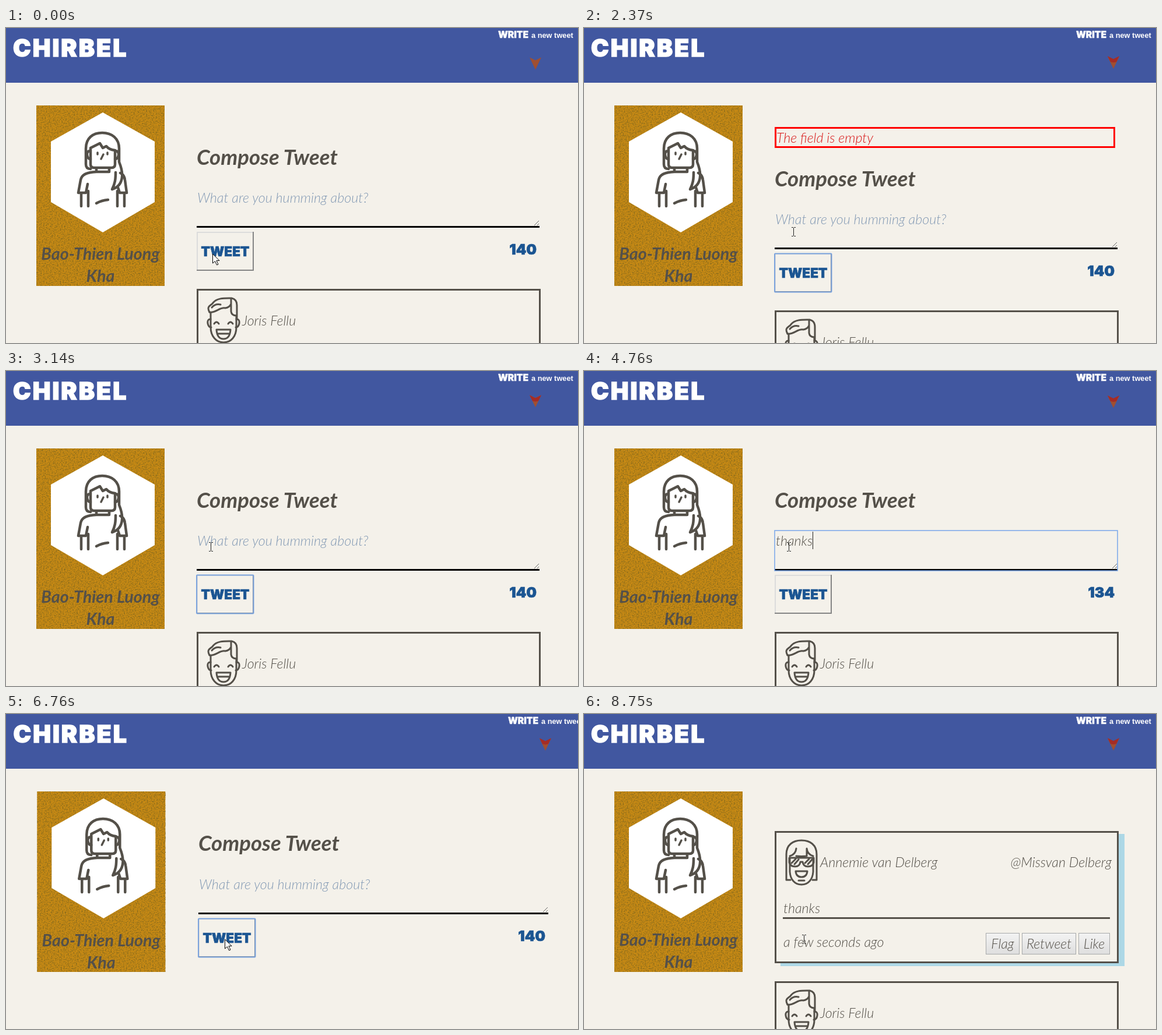
Animation of 981 by 541 pixels, one loop 8.83 s. Source, as an HTML page:

```html
<!DOCTYPE html>
<html lang="en">
<head>
<meta charset="utf-8">
<title>Compose a tweet</title>
<style>
html, body { margin: 0; width: 100%; height: 100%; overflow: hidden; background: #f4f1ea; }
svg { display: block; }
text { font: italic 300 23.3px Lato, "Open Sans", sans-serif; fill: #545049; white-space: pre; }
.block { font: 900 24px Inter, Roboto, sans-serif; fill: #1b5592; stroke: #1b5592; stroke-width: .7; }
.white { fill: #fff; stroke: #fff; }
.bold { font-weight: 700; }
.icon path { fill: none; stroke: #545049; stroke-linecap: round; stroke-linejoin: round; }
.box { fill: #f4f1ea; stroke: #545049; stroke-width: 3; }
.key { fill: url(#keyFill); stroke: #a7a9aa; }
.mid { text-anchor: middle; }
.end { text-anchor: end; }
</style>
</head>
<body>
<svg width="981" height="541" viewBox="0 0 981 541">
  <defs>
    <linearGradient id="keyFill" x2="0" y2="1">
      <stop stop-color="#f3f3f3"/><stop offset="1" stop-color="#dedede"/>
    </linearGradient>
    <filter id="grain" x="0" y="0" width="1" height="1" color-interpolation-filters="sRGB">
      <feTurbulence type="fractalNoise" baseFrequency=".42 .52" numOctaves="2" seed="4"/>
      <feColorMatrix values="0 0 0 0 .42  0 0 0 0 .36  0 0 0 0 .12  1.7 0 0 0 -.7"/>
    </filter>
    <clipPath id="errorClip"><rect id="errorWindow" x="328" y="173" width="582" height="30"/></clipPath>
    <clipPath id="composeClip"><rect id="composeWindow" x="320" y="180" width="661" height="361"/></clipPath>
  </defs>

  <rect width="981" height="541" fill="#f4f1ea"/>
  <rect width="981" height="94" fill="#4157a0"/>
  <text id="logo" class="block white" x="12" y="49" style="font-size:41px;letter-spacing:3px;stroke-width:1.5">CHIRBEL</text>
  <g id="nav">
    <text class="block white" x="844" y="17" style="font-size:15.6px;stroke-width:.4">WRITE</text>
    <text x="901" y="17" style="font:bold 12.8px 'Liberation Sans',Arial,sans-serif;fill:#fff">a new tweet</text>
    <path id="arrowBack" d="M-10 0L0 5L10 0L0 21Z" fill="#a04f32"/>
    <path id="arrowFront" d="M-10 0L0 5L10 0L5 10L0 11L-5 10Z" fill="#a52c26"/>
  </g>

  <g id="profile">
    <rect x="52" y="133" width="220" height="310" fill="#c88a14"/>
    <rect x="52" y="133" width="220" height="310" filter="url(#grain)"/>
    <path d="M166 145L255 195V299L166 351L77 299V195Z" fill="#fff"/>
    <g class="icon" stroke-width="4.5">
      <path d="M145 242Q137 242 137 234V207C137 189 149 180 165 180C182 180 194 190 194 207V230C198 240 200 247 199 256C198 267 191 274 182 277C187 267 188 260 188 248"/>
      <path d="M145 207V234Q145 240 151 240H181Q187 240 187 234V210M145 206L161 198L166 206L172 203Q177 209 187 210"/>
      <path d="M144 211Q138 212 139 218Q140 225 145 225M188 211Q194 212 193 218Q192 225 187 225"/>
      <path d="M155 242V247H177V242M155 247C139 248 130 251 128 261L124 283H137L140 268M196 249Q203 252 204 261L207 283H195L192 274"/>
      <path d="M129 285V306M141 280V306M191 280V306M203 285V306M155 301Q164 296 175 295" stroke-linecap="butt"/>
      <path d="M157 214V217M174 214V217M167 217L163 225" stroke-width="3.5"/>
    </g>
    <g id="owner">
      <text class="bold mid" x="162" y="398" style="font-size:28.7px">Bao-Thien Luong</text>
      <text class="bold mid" x="162" y="436" style="font-size:28.7px">Kha</text>
    </g>
  </g>

  <g id="error">
    <text x="330" y="197" clip-path="url(#errorClip)" style="fill:#d81818">The field is empty</text>
    <rect id="errorBox" x="328.5" y="171.5" width="581" fill="none" stroke="red" stroke-width="3"/>
  </g>

  <g clip-path="url(#composeClip)">
    <g id="compose">
      <text class="bold" x="327" y="235" style="font-size:36.6px">Compose Tweet</text>
      <g id="form">
        <text id="hint" x="328" y="300" style="fill:#8299b4">What are you humming about?</text>
        <text id="typed" x="329" y="300"></text>
        <rect id="caret" y="276" width="1" height="30" fill="#222"/>
        <path id="underline" stroke="#000" stroke-width="3"/>
        <rect id="fieldRing" x="327" y="274" width="588" height="69" fill="none" stroke="#78a6ea" stroke-width="1.5"/>
        <path d="M328 417V351H425" fill="none" stroke="#dcdcdc" stroke-width="2"/>
        <path d="M327 416H424V350" fill="none" stroke="#858585" stroke-width="2"/>
        <rect id="buttonRing" x="327" y="350.5" width="97.5" height="66" rx="1" fill="none" stroke="#7ba3dd" stroke-width="2"/>
        <text class="block mid" x="376" y="392" style="font-size:22.5px">TWEET</text>
        <g id="formRight">
          <path d="M906 339L914 331M911 339L914 336" stroke="#666"/>
          <text id="counter" class="block end" x="910" y="389" style="font-size:25px"></text>
        </g>
      </g>
    </g>
  </g>

  <g id="newTweet">
    <rect id="shadow" x="337" y="5" width="590" height="227" fill="#add8e6"/>
    <rect class="box" x="328.5" y="1.5" width="587" height="224"/>
    <g class="icon" stroke-width="3">
      <path d="M354 84H347V40C347 24 358 16 373 16C388 16 399 24 399 40V84H392"/>
      <path d="M353 46V70C354 84 362 92 373 92C384 92 392 84 393 70V46M353 43Q363 40 364 30M364 43Q373 44 382 43V30Q383 40 393 43"/>
      <path d="M352 46H394V54Q392 61 384 61Q376 61 375 53H371Q370 61 362 61Q354 61 352 54ZM356 55L363 48M361 57L368 49M379 55L386 48M384 57L391 49"/>
      <path d="M363 69H383Q382 79 373 79Q364 79 363 69ZM368 85H378"/>
    </g>
    <text x="405" y="62">Annemie van Delberg</text>
    <text class="end" x="905" y="62">@Missvan Delberg</text>
    <text x="342" y="141">thanks</text>
    <path d="M341 149.5H902" stroke="#545049" stroke-width="3"/>
    <text x="342" y="199">a few seconds ago</text>
    <rect class="key" x="689.5" y="175.5" width="57" height="36"/>
    <rect class="key" x="751.5" y="175.5" width="92" height="36"/>
    <rect class="key" x="848.5" y="175.5" width="53" height="36"/>
    <text class="mid" x="718" y="202">Flag</text>
    <text class="mid" x="797.5" y="202">Retweet</text>
    <text class="mid" x="875" y="202">Like</text>
  </g>

  <g id="oldTweet">
    <rect class="box" x="328.5" y="1.5" width="587" height="224"/>
    <g class="icon" stroke-width="3">
      <path d="M349 40C343 29 352 29 355 24C362 15 376 16 387 16Q396 18 396 28V52"/>
      <path d="M349 40C360 42 366 31 376 33Q383 32 386 26M353 32Q359 25 368 27M386 17V39Q387 46 395 46"/>
      <path d="M351 41V66C351 82 361 92 373 92C386 92 395 82 395 66V46"/>
      <path d="M351 52Q345 52 346 59Q347 66 352 66M395 52Q401 52 400 59Q399 66 394 66"/>
      <path d="M357 60Q361 54 365 60M381 60Q385 54 389 60M361 70H385Q384 86 373 86Q362 86 361 70ZM364 77H382"/>
    </g>
    <text x="405" y="63">Joris Fellu</text>
  </g>

  <path id="pointer" d="M0 0V16L4 12.5L7 19L9.5 18L6.5 11.5H11.5Z" fill="#fff" stroke="#000"/>
  <path id="beam" d="M-3.5 -7.5H-1L0 -6.5L1 -7.5H3.5M0 -6.5V6.5M-3.5 7.5H-1L0 6.5L1 7.5H3.5" fill="none" stroke="#222"/>
</svg>
<script>
const LOOP = 8830;
const SLIDE = 400;
const MESSAGE = 'thanks';
const TIMES = {
  firstClick: 800, errorIn: 885, errorOut: 2600, fieldFocus: 3450,
  typeStart: 3760, typeStep: 152, secondClick: 6380,
  listCleared: 6600, listLoaded: 6840, composeOut: 6880
};
// time, x, y
const CURSOR_PATH = [
  [0, 354.5, 388], [1850, 354.5, 388], [2350, 359.5, 350], [2450, 359.5, 350], [2950, 351.5, 302],
  [5150, 351.5, 302], [5520, 358, 346], [5950, 375.5, 387], [7000, 375.5, 387], [7250, 377.5, 387], [LOOP, 377.5, 387]
];

const ui = {};
document.querySelectorAll('[id]').forEach(el => ui[el.id] = el);

const clamp = v => Math.max(0, Math.min(1, v));
const swing = p => .5 - Math.cos(Math.PI * clamp(p)) / 2;
const slide = (t, start) => swing((t - start) / SLIDE);
const between = (t, a, b) => t >= a && t < b;
const show = (el, on) => el.setAttribute('display', on ? 'inline' : 'none');
const move = (el, x, y) => el.setAttribute('transform', `translate(${x} ${y})`);
const write = (el, s) => { if (el.textContent !== s) el.textContent = s; };

function cursorAt(t) {
  const i = CURSOR_PATH.findIndex(k => k[0] > t);
  const [t0, x0, y0] = CURSOR_PATH[i - 1], [t1, x1, y1] = CURSOR_PATH[i];
  const p = swing((t - t0) / (t1 - t0));
  return [x0 + (x1 - x0) * p, y0 + (y1 - y0) * p];
}

function drawArrow(t) {
  const bob = lag => 46 - 5 * Math.cos(2 * Math.PI * (t - 1050 - lag) / 1950);
  move(ui.arrowBack, 908, bob(60));
  move(ui.arrowFront, 908, bob(0));
  ui.arrowFront.setAttribute('opacity', clamp(t / 900));
}

// Draws the message box and returns how far it pushes the page down.
function drawError(t) {
  const visible = between(t, TIMES.errorIn, TIMES.errorOut + SLIDE);
  const inner = Math.round(30 * (slide(t, TIMES.errorIn) - slide(t, TIMES.errorOut)));
  show(ui.error, visible);
  ui.errorWindow.setAttribute('height', inner);
  ui.errorBox.setAttribute('height', inner + 3);
  return visible ? inner + 7 : 0;
}

function drawForm(t, wide) {
  const posted = t >= TIMES.listCleared;
  const count = Math.floor((t - TIMES.typeStart) / TIMES.typeStep) + 1;
  const typed = posted ? '' : MESSAGE.slice(0, Math.max(0, count));
  const focused = between(t, TIMES.fieldFocus, TIMES.secondClick);
  const lastKey = typed ? TIMES.typeStart + (typed.length - 1) * TIMES.typeStep : TIMES.fieldFocus;
  write(ui.typed, typed);
  write(ui.counter, String(140 - typed.length));
  show(ui.hint, !typed);
  show(ui.fieldRing, focused);
  show(ui.caret, focused && (t - lastKey) % 1000 < 500);
  ui.caret.setAttribute('x', Math.round(329 + ui.typed.getComputedTextLength()));
  show(ui.buttonRing, between(t, TIMES.firstClick, TIMES.fieldFocus) || t >= TIMES.secondClick);
  ui.underline.setAttribute('d', `M327 341.5H${wide ? 927 : 915}`);
  move(ui.form, 0, wide ? 1 : 0);
  move(ui.formRight, wide ? 12 : 0, 0);
}

function render(t) {
  // With the list empty the page needs no scrollbar and grows wider.
  const wide = between(t, TIMES.listCleared, TIMES.listLoaded);
  const loaded = t >= TIMES.listLoaded;
  const push = drawError(t);
  const hidden = slide(t, TIMES.composeOut);
  const listTop = 448 + push - 247 * hidden;

  drawArrow(t);
  drawForm(t, wide);
  move(ui.nav, wide ? 17 : 0, 0);
  move(ui.logo, wide ? .5 : 0, 0);
  move(ui.profile, wide ? 1.3 : 0, 0);
  move(ui.owner, 0, wide ? 1 : 0);
  move(ui.compose, wide ? 3 : 0, push);
  show(ui.compose, hidden < 1);
  ui.composeWindow.setAttribute('height', Math.max(0, listTop - 28 - 180));

  show(ui.newTweet, loaded);
  show(ui.oldTweet, !wide);
  move(ui.newTweet, 0, listTop);
  move(ui.oldTweet, 0, listTop + (loaded ? 258 : 0));

  const [x, y] = cursorAt(t);
  const overText = hidden === 1 || (!loaded && between(y, 274 + push, 343 + push));
  show(ui.shadow, listTop < y);
  show(ui.beam, overText);
  show(ui.pointer, !overText);
  move(ui.beam, x, y);
  move(ui.pointer, x, y);
}

const start = performance.now();
function tick() {
  render((performance.now() - start) % LOOP);
  requestAnimationFrame(tick);
}
tick();
</script>
</body>
</html>
```
